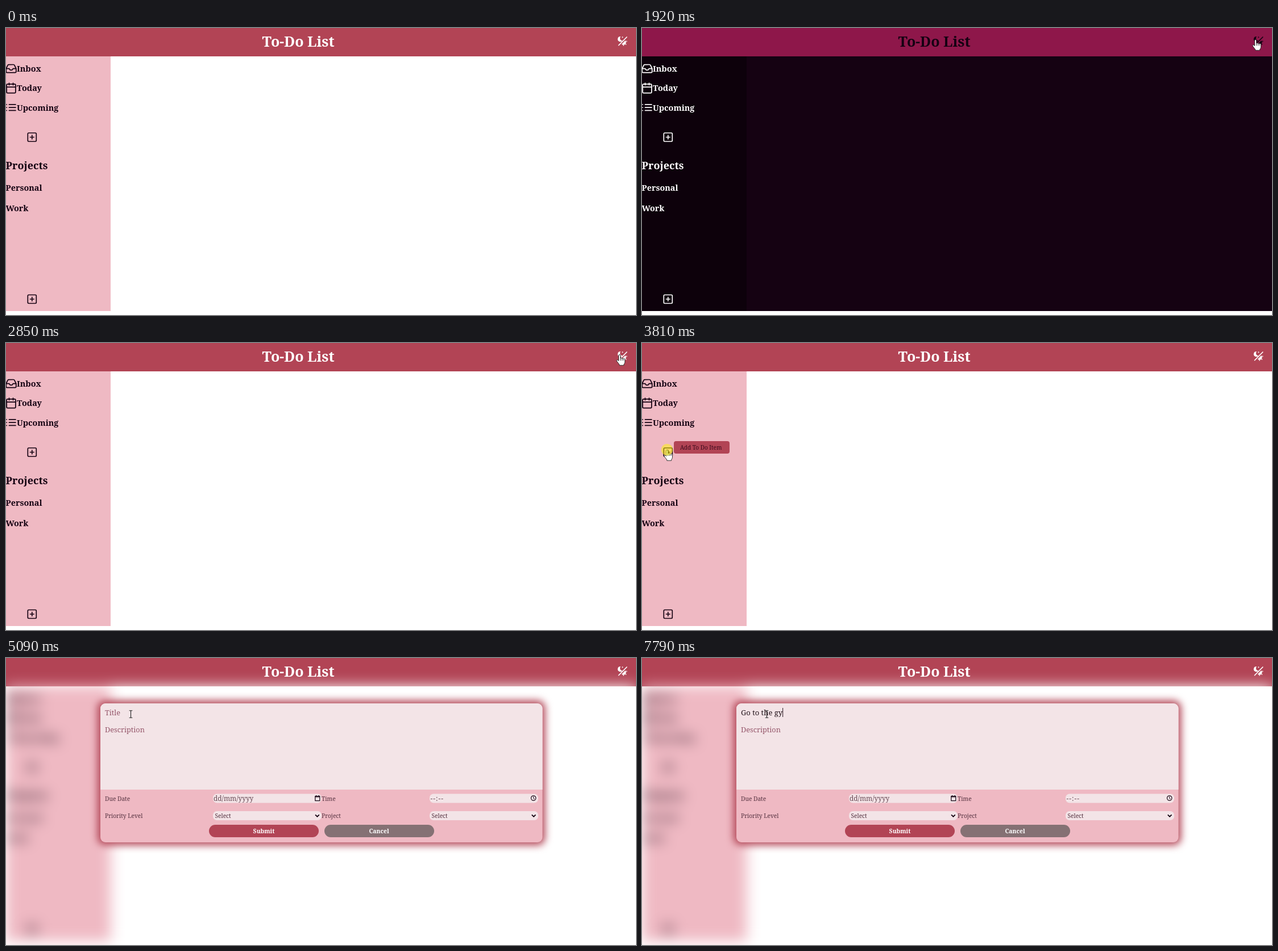
Animation, 1108 px wide and 506 px high, one loop 8 s. Source, as an HTML page:

```html
<!DOCTYPE html>
<html lang="en">
<head>
<meta charset="utf-8">
<title>To-Do List</title>
<style>
  html, body { margin: 0; width: 100%; height: 100%; overflow: hidden; background: #fff; }
  #stage {
    --bar: #b24455; --bar-ink: #fff; --side: #efb9c3; --page: #fff; --ink: #150212;
    display: block; width: 100vw; height: 100vh;
    font-family: "Noto Serif", "Liberation Serif", serif;
  }
  #stage.dark { --bar: #8e174a; --bar-ink: #150212; --side: #0d010b; --page: #150212; --ink: #fff; }
  #header { fill: var(--bar); }
  #title { font-size: 25px; font-weight: 700; text-anchor: middle; fill: var(--bar-ink); }
  #theme { fill: var(--bar-ink); stroke: var(--bar-ink); stroke-width: 0; }
  #page { fill: var(--page); }
  #side { fill: var(--side); }
  #nav { fill: var(--ink); font-size: 14.4px; font-weight: 600; }
  #nav use { color: var(--ink); }
  .icon { fill: none; stroke: currentColor; stroke-width: 2; stroke-linecap: round; stroke-linejoin: round; }
  .open #main { filter: blur(12px); }
  #modal { filter: none; }
  #shadow { fill: #b24455; filter: blur(7px); }
  .field { fill: #f3e4e7; }
  .label { font-size: 10.2px; fill: #54313f; }
  .hint { font-size: 12.7px; fill: #95566a; }
  .value { font-size: 11.8px; fill: #6a4a55; }
  .button { font-size: 10.4px; font-weight: 600; fill: #fff; text-anchor: middle; }
  .mark { fill: none; stroke: #150212; }
  #typed { font-size: 13px; fill: #24141c; white-space: pre; }
  #tip text { font-size: 10px; fill: #3a0a1b; }
  .off { display: none; }
</style>
</head>
<body>
<svg id="stage" viewBox="0 0 1108 506" preserveAspectRatio="none">
  <defs>
    <symbol id="inbox" viewBox="0 0 24 24" overflow="visible"><g class="icon">
      <path d="M22 12H16L14 15H10L8 12H2M5.45 5.1L2 12v6a2 2 0 0 0 2 2h16a2 2 0 0 0 2-2v-6l-3.45-6.9A2 2 0 0 0 16.8 4H7.2a2 2 0 0 0-1.75 1.1z"/></g></symbol>
    <symbol id="calendar" viewBox="0 0 24 24" overflow="visible"><g class="icon">
      <rect x="3" y="4" width="18" height="18" rx="2"/><path d="M16 2v4M8 2v4M3 10h18"/></g></symbol>
    <symbol id="list" viewBox="0 0 24 24" overflow="visible"><g class="icon">
      <path d="M8 6h13M8 12h13M8 18h13M3 6h.01M3 12h.01M3 18h.01"/></g></symbol>
    <symbol id="plus" viewBox="0 0 24 24" overflow="visible"><g class="icon">
      <rect x="3" y="3" width="18" height="18" rx="2"/><path d="M12 8v8M8 12h8"/></g></symbol>
  </defs>

  <rect id="header" width="1108" height="50"/>
  <text id="title" x="514" y="33">To-Do List</text>
  <g id="theme">
    <path d="M1081 15a4.6 4.6 0 1 0 3.2 7.2a4.2 4.2 0 0 1-3.2-7.2z"/>
    <path d="M1077.5 30.5L1091.8 16" stroke-width="1.7" fill="none" stroke-linecap="round"/>
    <path d="M1082.8 28.4L1089.2 22a4.2 4.2 0 0 1-6.4 6.4z"/>
    <circle cx="1084.3" cy="16.3" r="1"/>
    <circle cx="1091.5" cy="23.5" r=".9"/>
    <circle cx="1090.3" cy="28.8" r=".9"/>
    <circle cx="1086" cy="30.6" r=".9"/>
  </g>

  <g id="main">
    <rect id="page" y="50" width="1108" height="449"/>
    <rect id="side" y="50" width="184" height="449"/>
    <g id="nav">
      <use href="#inbox" x="-1.5" y="61" width="21" height="21"/>
      <use href="#calendar" x="-1.5" y="95.3" width="21" height="21"/>
      <use href="#list" x="-1.5" y="129.7" width="21" height="21"/>
      <use href="#plus" x="35.8" y="182.5" width="20" height="20"/>
      <use href="#plus" x="35.8" y="468" width="20" height="20"/>
      <text x="19" y="77">Inbox</text>
      <text x="19" y="111">Today</text>
      <text x="19" y="146">Upcoming</text>
      <text x="-.5" y="249" font-size="18">Projects</text>
      <text x="-.5" y="287">Personal</text>
      <text x="-.5" y="323">Work</text>
    </g>
    <g id="tip" class="off">
      <rect x="56" y="173" width="98" height="22" rx="4" fill="#b24455"/>
      <text x="67" y="187.5">Add To Do Item</text>
    </g>
  </g>

  <g id="modal" class="off">
    <rect id="shadow" x="161" y="75" width="787" height="255" rx="13"/>
    <rect x="166" y="80" width="777.5" height="245" rx="9" fill="#efb9c3"/>
    <path class="field" d="M166 232V89a9 9 0 0 1 9-9H934.5a9 9 0 0 1 9 9V232z"/>
    <text id="hint" class="hint" x="174" y="101">Title</text>
    <text class="hint" x="174" y="131">Description</text>
    <text id="typed" x="174" y="101"></text>
    <rect id="caret" y="88" width="1" height="16" fill="#24141c"/>

    <g class="label">
      <text x="174" y="251.5">Due Date</text>
      <text x="555" y="251.5">Time</text>
      <text x="174" y="282">Priority Level</text>
      <text x="555" y="282">Project</text>
    </g>
    <g class="field">
      <rect x="364" y="239.5" width="191" height="16" rx="7"/>
      <rect x="745" y="239.5" width="191" height="16" rx="7"/>
      <rect x="364" y="270" width="191" height="16" rx="7"/>
      <rect x="745" y="270" width="191" height="16" rx="7"/>
    </g>
    <text class="value" x="365" y="252">dd/mm/yyyy</text>
    <text class="value" x="746.5" y="252" letter-spacing="1.1">--:--</text>
    <text class="label" x="367.5" y="282">Select</text>
    <text class="label" x="748.5" y="282">Select</text>
    <g class="mark">
      <path d="M543.8 243.7h8v8h-8zM543.8 245h8M545.6 242v2M550 242v2" stroke-width="1.2"/>
      <circle cx="927.7" cy="247" r="4.2" stroke-width="1.2"/>
      <path d="M927.7 244.3v3l2 1.2"/>
      <path d="M544 276.3l3.4 3.4 3.4-3.4M924.7 276.3l3.4 3.4 3.4-3.4" stroke-width="1.8"/>
    </g>
    <rect x="357" y="294" width="193" height="22" rx="11" fill="#b24455"/>
    <rect x="560" y="294" width="193" height="22" rx="11" fill="#857174"/>
    <text class="button" x="453.5" y="309">Submit</text>
    <text class="button" x="656" y="309">Cancel</text>
  </g>

  <g id="cursor" stroke-linejoin="round">
    <path id="arrow" fill="#fff" stroke="#222" stroke-width=".8" d="M.4 .4V14.6l3.3-3.1 2.3 5 2.1-1-2.3-4.8h4.6z"/>
    <path id="hand" fill="#fff" stroke="#222" stroke-width=".9" d="M-1.5 11.5V2a1.5 1.5 0 0 1 3 0V7.5a1.4 1.4 0 0 1 2.8 .3a1.4 1.4 0 0 1 2.7 .5a1.3 1.3 0 0 1 2.5 .6V13q0 3-1.8 4.5V19.3H-.2V18L-4.8 12q-.8-1.6.6-2.2q1.2-.4 2.7 1.7zM1.5 7.5V11M4.3 7.8V11M7 8.3V11"/>
    <path id="beam" fill="none" stroke="#222" stroke-width="1.1" d="M-2.8 -6.3H2.8M0 -6.3V6.3M-2.8 6.3H2.8"/>
  </g>
  <circle id="click" r="10.3" fill="#fffa00" fill-opacity=".5"/>
</svg>

<script>
const LOOP = 8000, STEP = 70;
const $ = id => document.getElementById(id);
const show = (id, on) => $(id).classList.toggle('off', !on);
const within = (t, a, b) => t >= a && t < b;

const smooth = p => p * p * (3 - 2 * p);
const easeOut = p => 1 - (1 - p) ** 2;

// The pointer is sampled every STEP ms: [first step, step count, from, to, easing]
const moves = [
  [480, 11, [1064, 477], [1077, 43], smooth],
  [1250, 4, [1077, 43], [1079, 20], easeOut],
  [2980, 10, [1079, 20], [44, 188], smooth],
  [3940, 7, [44, 188], [219.5, 99], smooth]
];
// [start, end, x, y]
const clicks = [
  [1790, 1920, 1079, 20],
  [2650, 2850, 1079, 20],
  [3810, 3940, 44, 188],
  [4560, 4690, 217, 98.5]
];
const phrase = 'Go to the gy';
const keys = [5550, 5810, 6070, 6270, 6400, 6600, 6860, 7060, 7190, 7390, 7590, 7790];

function pointer(t) {
  const [start, count, from, to, ease] = moves.filter(m => t >= m[0]).pop() || moves[0];
  const step = Math.floor((t - start) / STEP) + 1;
  const p = ease(Math.min(1, Math.max(0, step / count)));
  return from.map((v, i) => v + (to[i] - v) * p);
}

function shape(x, y, open) {
  if (open) return x > 166 && y > 80 && y < 232 ? 'beam' : 'arrow';
  const onTheme = x > 1072 && y < 36;
  const onPlus = x > 36 && x < 56 && y > 181 && y < 204;
  return onTheme || onPlus ? 'hand' : 'arrow';
}

function render(t) {
  const open = t >= 3940;
  $('stage').classList.toggle('dark', within(t, 1920, 2850));
  $('stage').classList.toggle('open', open);
  show('modal', open);

  const [x, y] = pointer(t);
  const kind = shape(x, y, open);
  show('cursor', t >= 410);
  $('cursor').setAttribute('transform', `translate(${x} ${y})`);
  for (const id of ['arrow', 'hand', 'beam']) show(id, id === kind);
  show('tip', !open && kind === 'hand' && x < 184);

  const hit = clicks.find(c => within(t, c[0], c[1]));
  show('click', hit);
  if (hit) $('click').setAttribute('transform', `translate(${hit[2]} ${hit[3]})`);

  const typed = phrase.slice(0, keys.filter(k => t >= k).length);
  if ($('typed').textContent !== typed) $('typed').textContent = typed;
  show('hint', !typed);
  show('caret', typed || within(t, 4690, 5090));
  $('caret').setAttribute('x', 174 + (typed ? $('typed').getComputedTextLength() : 0));
}

function tick() {
  render(performance.now() % LOOP);
  requestAnimationFrame(tick);
}
tick();
</script>
</body>
</html>
```
